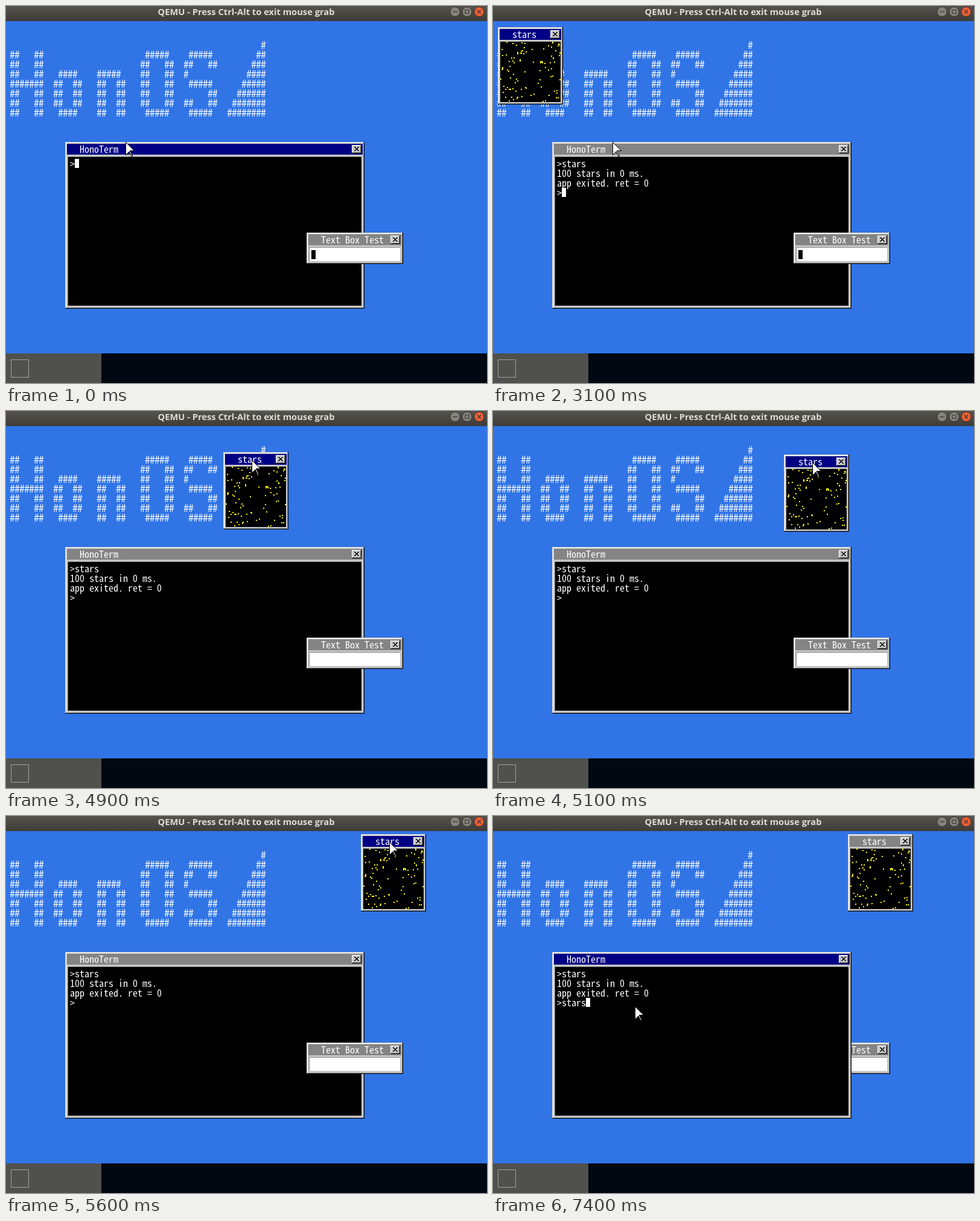
Recreate the animation shown at these times as an HTML page with a canvas. Size 797 px wide and 624 px high, loop 8000 ms.

```html
<!DOCTYPE html>
<html lang="en">
<head>
<meta charset="utf-8">
<title>HonOS desktop</title>
<style>
  html, body { margin: 0; width: 100%; height: 100%; overflow: hidden; background: #3074e6; }
  canvas { display: block; }
</style>
</head>
<body>
<canvas id="stage" width="797" height="624"></canvas>
<script>
const LOOP = 8000, STEP = 100;
const LIGHT = '#c6c6c6', DARK = '#848484', NAVY = '#000084';
const ctx = document.getElementById('stage').getContext('2d');

// Pick the size at which one monospaced cell is 8 px wide.
const MONO = '"Noto Sans Mono CJK JP", "Liberation Mono", monospace';
ctx.font = `100px ${MONO}`;
const cellSize = 800 / ctx.measureText('0').width;
const textFont = `${cellSize}px ${MONO}`;
const bannerFont = `${cellSize * 1.12}px ${MONO}`;

const BANNER = [
  '',
  ' ##   ##                     #####    #####',
  ' ##   ##                    ##   ##  ##   ##',
  ' ##   ##   ####    #####    ##   ##  #',
  ' #######  ##  ##   ##  ##   ##   ##   #####',
  ' ##   ##  ##  ##   ##  ##   ##   ##       ##',
  ' ##   ##  ##  ##   ##  ##   ##   ##  ##   ##',
  ' ##   ##   ####    ##  ##    #####    #####'
].map((row, i) => row.padEnd(53 - i) + '#'.repeat(i + 1));

// Times at which the text carets flip; they start visible.
const BLINKS = [700, 1200, 1500, 2400, 2500, 3100, 3900, 4400, 4900, 5300, 5600, 6100, 6500, 7300];
const KEYS = [800, 900, 1200, 1300, 1400];

const APPROACH = [[176, 196], [140, 150], [104, 105], [72, 62], [50, 34], [44, 29], [54, 48]];
const DRAG = [[62, 44], [205, 60], [360, 68], [428, 72], [482, 72], [526, 68], [558, 64], [571, 46], [578, 32], [588, 30]];
const LEAVE = [[672, 66], [682, 130], [560, 200], [410, 262], [290, 308], [229, 327]];

const held = (points, start, t) => points[Math.min(points.length - 1, Math.floor((t - start) / STEP))];

function starsPos(t) {
  return t < 4700 ? [8, 35] : held(DRAG, 4700, t);
}

function mousePos(t) {
  if (t < 3900) return [198, 225];
  if (t < 4700) return held(APPROACH, 3900, t);
  if (t < 5700) {
    const [x, y] = starsPos(t);
    return [x + 47, y + 13];
  }
  return t < 6900 ? held(LEAVE, 5700, t) : [235, 315];
}

function termLines(t) {
  const typed = KEYS.filter(k => k <= t).length;
  const lines = ['>' + 'stars'.slice(0, typed)];
  if (t >= 2400) lines.push('100 stars in 0 ms.');
  if (t >= 2500) lines.push('app exited. ret = 0', t >= 7400 ? '>stars' : '>');
  else if (t >= 2400) lines.push('');
  return lines;
}

// Seeded star field inside a 100 x 100 area.
function makeStars(count) {
  let seed = 1;
  const next = () => {
    let v;
    do {
      seed = seed * 48271 % 2147483647;
      v = (seed - 1) & 127;
    } while (v >= 99);
    return v;
  };
  return Array.from({ length: count }, () => {
    const x = next();
    return [x, next()];
  });
}
const stars = makeStars(100);

function rect(x, y, w, h, color) {
  ctx.fillStyle = color;
  ctx.fillRect(x, y, w, h);
}

function text(str, x, y, font = textFont) {
  ctx.font = font;
  ctx.textAlign = 'left';
  ctx.fillStyle = '#fff';
  [...str].forEach((c, i) => {
    if (c !== ' ') ctx.fillText(c, x + i * 8, y + 14);
  });
}

function closeButton(x, y) {
  rect(x, y, 16, 14, '#000');
  rect(x, y, 15, 13, '#fff');
  rect(x + 1, y + 1, 14, 12, DARK);
  rect(x + 1, y + 1, 13, 11, LIGHT);
  for (let i = 0; i < 7; i++) {
    rect(x + 4 + i, y + 3 + i, 2, 1, '#000');
    rect(x + 10 - i, y + 3 + i, 2, 1, '#000');
  }
}

function frame(x, y, w, h, title, active) {
  rect(x, y, w, h, '#000');
  rect(x, y, w - 1, h - 1, LIGHT);
  rect(x + 1, y + 1, w - 2, h - 2, DARK);
  rect(x + 1, y + 1, w - 3, h - 3, '#fff');
  rect(x + 2, y + 2, w - 4, h - 4, LIGHT);
  rect(x + 3, y + 3, w - 6, 18, active ? NAVY : DARK);
  text(title, x + 24, y + 4);
  closeButton(x + w - 21, y + 5);
}

function field(x, y, w, h, color) {
  rect(x, y, w, h, LIGHT);
  rect(x, y, w - 1, h - 1, DARK);
  rect(x + 1, y + 1, w - 2, h - 2, color);
}

function drawTerminal(t, caret) {
  frame(98, 225, 496, 276, 'HonoTerm', t < 2400 || t >= 6400);
  field(102, 249, 488, 248, '#000');
  const lines = termLines(t), last = lines.length - 1;
  lines.forEach((line, i) => text(line, 106, 253 + i * 16));
  if (caret) rect(106 + lines[last].length * 8, 253 + last * 16, 7, 15, '#fff');
}

function drawTextBox(caret) {
  frame(498, 375, 160, 52, 'Text Box Test', false);
  field(502, 399, 152, 24, '#fff');
  if (caret) rect(506, 404, 7, 15, '#000');
}

function drawStars(t) {
  const [x, y] = starsPos(t);
  frame(x, y, 108, 128, 'stars', t < 6400);
  rect(x + 4, y + 24, 100, 100, '#000');
  stars.forEach(([sx, sy]) => rect(x + 4 + sx, y + 24 + sy, 2, 2, '#fff414'));
}

// Arrow built row by row: a widening head, a tapering foot and a slanted tail.
function drawMouse(x, y) {
  for (let r = 0; r < 22; r++) {
    const end = r < 14 ? r : r < 16 ? 7 : 21 - r;
    rect(x, y + r, Math.max(end, 0) + 1, 1, '#000');
    if (end > 1) rect(x + 1, y + r, end - 1, 1, '#fff');
  }
  rect(x + 7, y + 14, 8, 1, '#000');
  for (let r = 16; r < 23; r++) {
    const col = x + (r >> 1) - 1;
    rect(col - 1, y + r, 3, 1, '#000');
    rect(col, y + r, 1, 1, '#fff');
  }
  rect(x + 9, y + 23, 3, 1, '#000');
}

function titleButton(x, fill, edge, icon) {
  ctx.beginPath();
  ctx.arc(x, 9.5, 8, 0, Math.PI * 2);
  ctx.fillStyle = fill;
  ctx.fill();
  ctx.strokeStyle = edge;
  ctx.lineWidth = 1;
  ctx.stroke();
  ctx.beginPath();
  icon(x, 9.5);
  ctx.strokeStyle = '#393833';
  ctx.lineWidth = 1.2;
  ctx.stroke();
}

function drawTitleBar() {
  const shade = ctx.createLinearGradient(0, 0, 0, 25);
  shade.addColorStop(0, '#54534d');
  shade.addColorStop(1, '#3d3c38');
  rect(0, 0, 797, 25, shade);
  ctx.font = '700 14.7px "Open Sans", "Noto Sans", sans-serif';
  ctx.textAlign = 'center';
  ctx.fillStyle = '#dfdbd2';
  ctx.fillText('QEMU - Press Ctrl-Alt to exit mouse grab', 398, 15);
  titleButton(744, '#85837b', '#35342f', (x, y) => {
    ctx.moveTo(x - 4, y);
    ctx.lineTo(x + 4, y);
  });
  titleButton(764, '#85837b', '#35342f', (x, y) => ctx.rect(x - 3, y - 3, 6, 6));
  titleButton(784, '#ee6037', '#4a2a1e', (x, y) => {
    ctx.moveTo(x - 3, y - 3);
    ctx.lineTo(x + 3, y + 3);
    ctx.moveTo(x + 3, y - 3);
    ctx.lineTo(x - 3, y + 3);
  });
}

function drawDesktop() {
  rect(0, 25, 797, 550, '#3074e6');
  BANNER.forEach((row, i) => text(row, -2, 57 + i * 16, bannerFont));
  rect(0, 575, 797, 49, '#010811');
  rect(0, 575, 158, 49, '#50504d');
  ctx.strokeStyle = '#a0a09e';
  ctx.lineWidth = 1;
  ctx.strokeRect(8.5, 585.5, 29, 29);
}

function draw(t) {
  const caret = BLINKS.filter(b => b <= t).length % 2 === 0;
  const typing = t >= 800 && t < 1200;
  const terminal = () => drawTerminal(t, caret || typing);
  drawDesktop();
  drawTitleBar();
  if (t < 6400) terminal();
  drawTextBox(caret);
  if (t >= 6400) terminal();
  if (t >= 2400) drawStars(t);
  drawMouse(...mousePos(t));
}

const begin = performance.now();
function tick() {
  draw((performance.now() - begin) % LOOP);
  requestAnimationFrame(tick);
}
tick();
</script>
</body>
</html>
```
